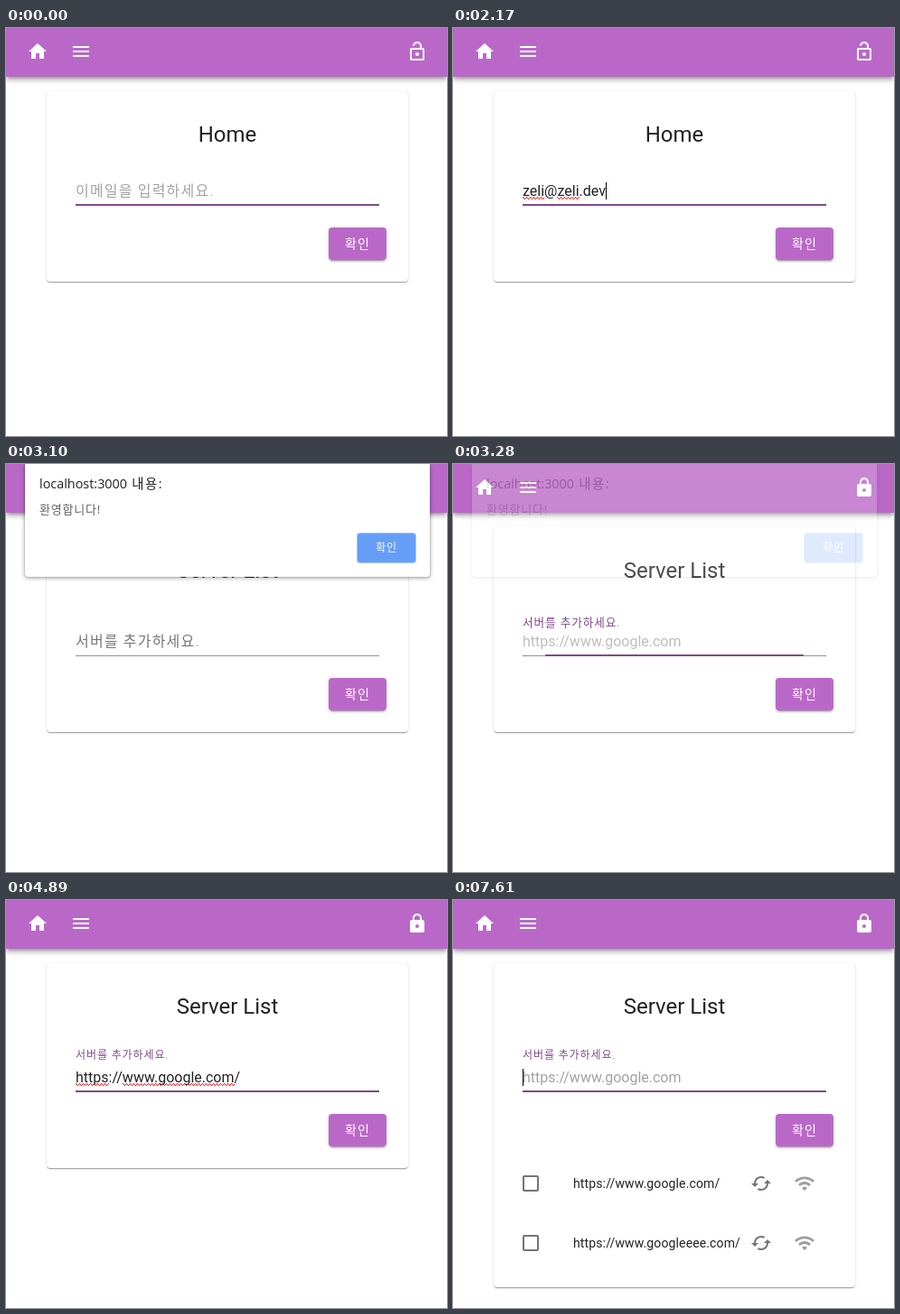
An HTML page for the animation above (8 s loop, 488 by 452 pixels).

```html
<!DOCTYPE html>
<html lang="ko">
<head>
<meta charset="utf-8">
<title>Server List</title>
<style>
html, body { margin: 0; width: 100%; height: 100%; overflow: hidden; background: #fff; }
body { position: relative; font: 16px/19px Roboto, "Noto Sans CJK KR", "Noto Sans CJK JP", sans-serif; color: rgba(0,0,0,.87); }
div, svg, button { position: absolute; white-space: pre; }
svg { top: 0; width: 24px; height: 24px; fill: currentColor; }
.ko { font-weight: 300; letter-spacing: 1.2px; }
#bar { left: 0; right: 0; top: -2px; height: 56px; background: #ba68c8; color: #fff;
  box-shadow: 0 2px 4px -1px rgba(0,0,0,.3), 0 4px 5px rgba(0,0,0,.16), 0 1px 10px rgba(0,0,0,.14); }
#bar svg { top: 16px; }
#card { left: 45px; top: 70px; width: 400px; border-radius: 4px; background: #fff;
  box-shadow: 0 2px 1px -1px rgba(0,0,0,.2), 0 1px 1px rgba(0,0,0,.14), 0 1px 3px rgba(0,0,0,.12), 0 0 1px rgba(0,0,0,.15); }
#title { left: 0; width: 400px; top: 32px; font-size: 24px; line-height: 32px; text-align: center; }
#label { left: 32px; top: 0; transform-origin: 0 0; }
#form { left: 0; top: 0; }
#input, #hint { left: 32px; top: 101px; height: 19px; }
#line, #focus { left: 32px; width: 336px; }
#line { top: 126px; height: 1px; background: rgba(0,0,0,.42); }
#focus { top: 125px; height: 2px; background: #82488c; }
button { border: 0; padding: 0 0 2px; color: #fff; font-family: inherit; letter-spacing: 1.2px; text-align: center; }
#ok { left: 312px; top: 151px; width: 64px; height: 36px; border-radius: 4px; background: #ba68c8; font-size: 14px;
  box-shadow: 0 3px 1px -2px rgba(0,0,0,.2), 0 2px 2px rgba(0,0,0,.14), 0 1px 5px rgba(0,0,0,.12); }
u { position: relative; text-decoration: none; }
u::after { content: ""; position: absolute; left: 0; right: 0; top: 16px; height: 3px;
  background:
    repeating-linear-gradient(90deg, red 0 1px, #0000 1px 4px) 0 0 / 100% 1px no-repeat,
    repeating-linear-gradient(90deg, #0000 0 1px, red 1px 2px) 0 1px / 100% 1px no-repeat,
    repeating-linear-gradient(90deg, #0000 0 2px, red 2px 3px, #0000 3px 4px) 0 2px / 100% 1px no-repeat; }
i { position: absolute; top: 0; width: 1px; height: 19px; background: #000; }
.row { left: 0; width: 400px; height: 24px; font-size: 14px; }
.row svg { color: #757575; }
.row div { left: 88px; top: 3px; letter-spacing: .13px; }
#alert { left: 21px; top: 0; width: 448px; height: 125px; border-radius: 0 0 3px 3px; background: #fff; font-family: "Open Sans", "Noto Sans CJK KR", "Noto Sans CJK JP", sans-serif;
  box-shadow: 0 0 1px rgba(0,0,0,.6), 0 1px 5px rgba(0,0,0,.4); }
#alert div { left: 16px; }
#alert button { left: 368px; top: 77px; width: 64px; height: 32px; border-radius: 3px; background: #669df6; font-size: 12px; letter-spacing: .8px;
  box-shadow: 0 0 0 1px #a9c8fa; }
</style>
</head>
<body>
<svg style="display:none">
  <path id="box" d="M19 5v14H5V5h14m0-2H5c-1.1 0-2 .9-2 2v14c0 1.1.9 2 2 2h14c1.1 0 2-.9 2-2V5c0-1.1-.9-2-2-2z"/>
  <path id="sync" d="M19 8l-4 4h3c0 3.31-2.69 6-6 6-1.01 0-1.97-.25-2.8-.7l-1.46 1.46C8.97 19.54 10.43 20 12 20c4.42 0 8-3.58 8-8h3l-4-4zM6 12c0-3.31 2.69-6 6-6 1.01 0 1.97.25 2.8.7l1.46-1.46C15.03 4.46 13.57 4 12 4c-4.42 0-8 3.58-8 8H1l4 4 4-4H6z"/>
  <path id="wifi" d="M1 9l2 2c4.97-4.97 13.03-4.97 18 0l2-2C16.93 2.93 7.08 2.93 1 9zm8 8l3 3 3-3c-1.65-1.66-4.34-1.66-6 0zm-4-4l2 2c2.76-2.76 7.24-2.76 10 0l2-2C15.14 9.14 8.87 9.14 5 13z"/>
</svg>

<div id="bar">
  <svg style="left:23px"><path d="M10 20v-6h4v6h5v-8h3L12 3 2 12h3v8z"/></svg>
  <svg style="left:71px"><path d="M3 18h18v-2H3v2zm0-5h18v-2H3v2zm0-7v2h18V6H3z"/></svg>
  <svg id="unlocked" style="left:443px"><path d="M12 17c1.1 0 2-.9 2-2s-.9-2-2-2-2 .9-2 2 .9 2 2 2zm6-9h-1V6c0-2.76-2.24-5-5-5S7 3.24 7 6h1.9c0-1.71 1.39-3.1 3.1-3.1 1.71 0 3.1 1.39 3.1 3.1v2H6c-1.1 0-2 .9-2 2v10c0 1.1.9 2 2 2h12c1.1 0 2-.9 2-2V10c0-1.1-.9-2-2-2zm0 12H6V10h12v10z"/></svg>
  <svg id="locked" style="left:443px"><path d="M18 8h-1V6c0-2.76-2.24-5-5-5S7 3.24 7 6v2H6c-1.1 0-2 .9-2 2v10c0 1.1.9 2 2 2h12c1.1 0 2-.9 2-2V10c0-1.1-.9-2-2-2zm-6 9c-1.1 0-2-.9-2-2s.9-2 2-2 2 .9 2 2-.9 2-2 2zm3.1-9H8.9V6c0-1.71 1.39-3.1 3.1-3.1 1.71 0 3.1 1.39 3.1 3.1v2z"/></svg>
</div>

<div id="card">
  <div id="title"></div>
  <div id="label" class="ko">서버를 추가하세요.</div>
  <div id="form">
    <div id="hint"></div>
    <div id="input"></div>
    <div id="line"></div>
    <div id="focus"></div>
    <button id="ok">확인</button>
  </div>
  <div class="row" style="top:232px">
    <svg style="left:29px"><use href="#box"/></svg>
    <div>https://www.google.com/</div>
    <svg style="left:284px"><use href="#sync"/></svg>
    <svg style="left:332px;color:#9e9e9e"><use href="#wifi"/></svg>
  </div>
</div>

<div id="alert">
  <div style="top:12px;font-size:14.4px">localhost:3000<span style="letter-spacing:1.5px"> 내용:</span></div>
  <div style="top:41px;font-size:13px;letter-spacing:.8px;color:#5f6368">환영합니다!</div>
  <button>확인</button>
</div>

<script>
const $ = id => document.getElementById(id);
const LOOP = 8000, LOGIN = 3100;

// Input text over time: ~word~ is marked as misspelt, | is the caret
const link = '~https~://~www.google.com~/';
const typing = [
  [0, ''], [530, '|'], [700, 'z|'], [775, 'ze|'], [850, 'zeli|'],
  [1160, '~zeli~@|'], [1310, '~zeli~@z|'], [1390, '~zeli~@ze|'],
  [1560, '~zeli~@zel|'], [1630, '~zeli~@zeli|'], [1780, '~zeli~@zeli.|'],
  [1860, '~zeli~@~zeli~.|'], [1940, '~zeli~@~zeli~.d|'],
  [2020, '~zeli~@~zeli~.de|'], [2170, '~zeli~@~zeli~.dev|'],
  [LOGIN, ''], [3350, '|'], [3650, ''], [4200, '|'],
  [4430, link + '|'], [4890, link], [5120, '|'], [5590, link + '|'],
  [6140, link.replace('com', '|com')], [6450, link.replace('.com', '|.com')],
  [7000, '~https~://www.googlee|.com/'], [7150, '~https~://www.googleee|.com/'],
  [7300, '~https~://www.googleeee|.com/'], [7530, '|']
];
const alertFade = [[0, 0], [2420, .3], [2500, .7], [2570, 1], [3190, .6], [3270, .2], [3350, 0]];
const focusing = [[0, 1], [LOGIN, 0], [3190, .45], [3270, .85], [3350, 1]];
const hintFade = [[0, 1], [LOGIN, 0], [3190, .3], [3270, .7], [3350, 1],
  [5120, .5], [5210, 1], [7530, .5], [7610, 1]];
const rowCount = [[0, 0], [5120, 1], [7530, 2]];

const at = (steps, t) => steps.findLast(s => s[0] <= t)[1];
const show = (el, on) => el.style.visibility = on ? '' : 'hidden';
const mix = (a, b, p) => a + (b - a) * p;

const first = document.querySelector('.row');
const second = first.cloneNode(true);
second.style.top = '298px';
second.querySelector('div').textContent = 'https://www.googleeee.com/';
$('card').append(second);
const rows = [first, second];

let shown;
function render(t) {
  const server = t >= LOGIN, text = at(typing, t), p = at(focusing, t);
  const fade = at(alertFade, t), hint = at(hintFade, t), count = at(rowCount, t);
  const key = [server, text, p, fade, hint, count].join();
  if (key === shown) return;
  shown = key;

  show($('unlocked'), !server);
  show($('locked'), server);
  $('title').textContent = server ? 'Server List' : 'Home';
  $('card').style.height = (server ? 227 + 66 * count : 211) + 'px';
  $('form').style.top = server ? '16px' : '0';

  $('hint').textContent = server ? 'https://www.google.com' : '이메일을 입력하세요.';
  $('hint').className = server ? '' : 'ko';
  $('hint').style.opacity = text.replace('|', '') ? 0 : .42 * hint;
  $('input').innerHTML = text.replace(/~(.*?)~/g, '<u>$1</u>').replace('|', '<i></i>');

  show($('label'), server);
  $('label').style.transform = `translateY(${mix(117, 94.5, p)}px) scale(${mix(1, .75, p)})`;
  $('label').style.color = p ? '#82488c' : 'rgba(0,0,0,.54)';
  $('focus').style.transform = `scaleX(${p})`;

  rows.forEach((row, i) => show(row, i < count));
  $('alert').style.opacity = fade;
}

const start = performance.now();
(function tick() {
  render((performance.now() - start) % LOOP);
  requestAnimationFrame(tick);
})();
</script>
</body>
</html>
```
